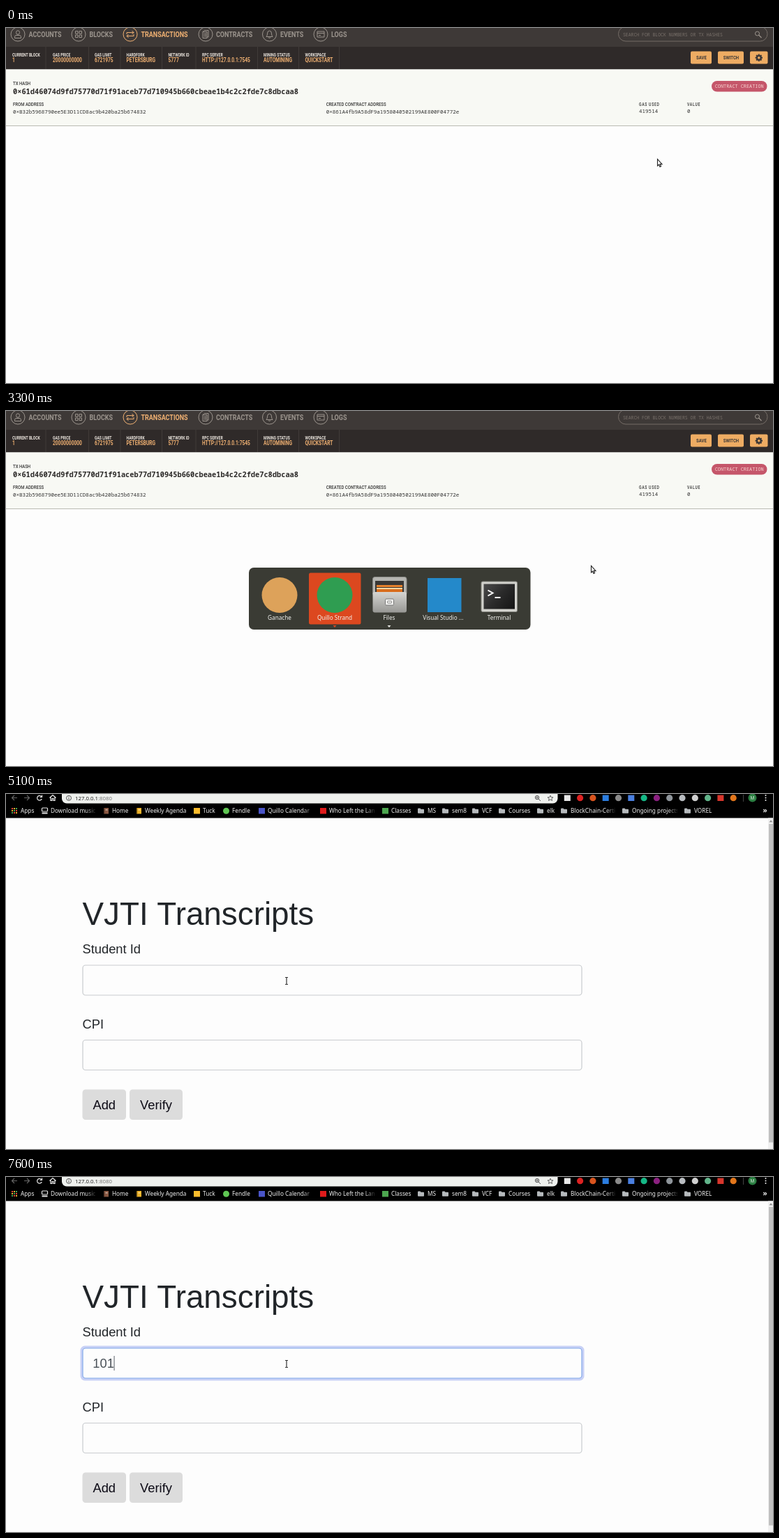
Recreate the animation shown at these times as an HTML page with a canvas. Size 1099 px wide and 510 px high, loop 8000 ms.

```html
<!DOCTYPE html>
<html lang="en">
<head>
<meta charset="utf-8">
<title>Transcripts demo</title>
<style>
html, body { margin: 0; width: 100%; height: 100%; overflow: hidden; background: #fdfdfd; }
canvas { display: block; width: 1099px; height: 510px; }
</style>
</head>
<body>
<canvas id="stage"></canvas>
<script>
const W = 1099, H = 510, LOOP = 8000;
const canvas = document.getElementById('stage');
const ctx = canvas.getContext('2d');
const dpr = window.devicePixelRatio || 1;
canvas.width = W * dpr;
canvas.height = H * dpr;

const MONO = '"Noto Sans Mono", monospace';
const UI = '"Noto Sans", sans-serif';
const ARIAL = '"Liberation Sans", Arial, sans-serif';
const ORANGE = '#efb072', GREY = '#9b948d', BAR = '#3e3937';

function rect(x, y, w, h, fill) {
  ctx.fillStyle = fill;
  ctx.fillRect(x, y, w, h);
}

function box(x, y, w, h, r, fill, stroke, lw = 1) {
  ctx.beginPath();
  ctx.roundRect(x, y, w, h, r);
  paint(fill, stroke, lw);
}

function disc(x, y, r, fill, stroke, lw = 1) {
  ctx.beginPath();
  ctx.arc(x, y, r, 0, 2 * Math.PI);
  paint(fill, stroke, lw);
}

function paint(fill, stroke, lw) {
  if (fill) { ctx.fillStyle = fill; ctx.fill(); }
  if (stroke) { ctx.strokeStyle = stroke; ctx.lineWidth = lw; ctx.stroke(); }
}

// SVG path data, placed at (x, y)
function shape(d, x, y, fill, stroke, lw = 1) {
  const p = new Path2D(d);
  ctx.save();
  ctx.translate(x, y);
  if (fill) { ctx.fillStyle = fill; ctx.fill(p); }
  if (stroke) { ctx.strokeStyle = stroke; ctx.lineWidth = lw; ctx.stroke(p); }
  ctx.restore();
}

function text(s, x, y, font, color, align = 'left') {
  ctx.font = font;
  ctx.fillStyle = color;
  ctx.textAlign = align;
  ctx.fillText(s, x, y);
}

// Roboto in a condensed cut
function narrow(s, x, y, size, color, weight = 700, spacing = 0) {
  ctx.save();
  ctx.translate(x, y);
  ctx.scale(0.78, 1);
  ctx.letterSpacing = spacing + 'px';
  text(s, 0, 0, `${weight} ${size}px Roboto, sans-serif`, color);
  ctx.restore();
}

// ---- Block explorer ----

const NAV = [
  ['ACCOUNTS', 17, 32.5, 'M-4.5 5.5V3.5Q-4.5 1.5-2 1.5H2Q4.5 1.5 4.5 3.5V5.5ZM-2.5-2.5a2.5 2.8 0 1 0 5 0a2.5 2.8 0 1 0-5 0'],
  ['BLOCKS', 104, 119.5, 'M-4.5-4.5h3.5v3.5h-3.5zM1-4.5h3.5v3.5h-3.5zM-4.5 1h3.5v3.5h-3.5zM1 1h3.5v3.5h-3.5z'],
  ['TRANSACTIONS', 178, 193.5, 'M-5 0V-2.5H5M2.5-5L5-2.5L2.5 0M5 0V2.5H-5M-2.5 0L-5 2.5L-2.5 5'],
  ['CONTRACTS', 286, 301, 'M-2-5.5H4V4H2M-4-3.5L-2-5.5M-4-3.5V5.5H2V-3.5H-4M-2.5-1H1M-2.5 1H1M-2.5 3H1'],
  ['EVENTS', 377.5, 393, 'M-4.5 3.5Q-3 2-3-1Q-3-5 0-5Q3-5 3-1Q3 2 4.5 3.5ZM-1.5 4.5Q0 6.5 1.5 4.5'],
  ['LOGS', 451, 466, 'M-5-4H5V4H-5ZM-5-1.5H5M-3 1.5H0']
];

const INFO = [
  [9, 'CURRENT BLOCK', '1', 56.5],
  [67, 'GAS PRICE', '20000000000', 118],
  [127, 'GAS LIMIT', '6721975', 163.5],
  [172.5, 'HARDFORK', 'PETERSBURG', 223],
  [232.5, 'NETWORK ID', '5777', 271.5],
  [281, 'RPC SERVER', 'HTTP://127.0.0.1:7545', 360],
  [369, 'MINING STATUS', 'AUTOMINING', 419],
  [428.5, 'WORKSPACE', 'QUICKSTART', 477]
];

function gear(x, y) {
  ctx.strokeStyle = BAR;
  ctx.lineWidth = 2.2;
  for (let i = 0; i < 4; i++) {
    const c = Math.cos(i * Math.PI / 4) * 5.2, s = Math.sin(i * Math.PI / 4) * 5.2;
    ctx.beginPath();
    ctx.moveTo(x - c, y - s);
    ctx.lineTo(x + c, y + s);
    ctx.stroke();
  }
  disc(x, y, 4, BAR);
  disc(x, y, 1.7, '#eeac63');
}

function explorer() {
  rect(0, 0, W, H, '#fdfdfd');
  rect(0, 0, W, 27, BAR);
  rect(0, 27, W, 32.5, '#2f2a29');
  rect(0, 59.5, W, 81, '#f8f9f4');
  rect(0, 140, W, 1, '#b9bab3');

  for (const [label, ix, tx, icon] of NAV) {
    const c = label === 'TRANSACTIONS' ? ORANGE : GREY;
    disc(ix, 9, 10, null, c);
    shape(icon, ix, 9, null, c);
    narrow(label, tx, 13.3, 11.5, c);
  }
  box(877.5, -2, 213.5, 21, 10.5, null, '#756d67');
  text('SEARCH FOR BLOCK NUMBERS OR TX HASHES', 884, 11.8, '6.45px ' + MONO, '#78706a');
  disc(1076.5, 8, 3, null, GREY);
  shape('M0 0L4 4', 1078.5, 10, null, GREY, 1.2);

  for (const [x, label, value, edge] of INFO) {
    narrow(label, x, 41, 6.5, '#ece6df');
    narrow(value, x, 48.5, 8.5, ORANGE);
    rect(edge, 27, 1, 32, '#413b39');
  }
  for (const [x, w, label, tx] of [[981, 30, 'SAVE', 989], [1020, 37, 'SWITCH', 1027.7], [1066, 25.5, '', 0]]) {
    box(x, 33.5, w, 18, 2, '#eeac63');
    narrow(label, tx, 45.3, 7.7, BAR);
  }
  gear(1078.8, 42.7);

  narrow('TX HASH', 10, 81.8, 7.7, '#333', 500);
  text('0×61d46074d9fd75770d71f91aceb77d710945b660cbeae1b4c2c2fde7c8dbcaa8', 10, 94.8, '600 10.33px ' + MONO, '#2c2a29');
  narrow('FROM ADDRESS', 10, 112.2, 7.7, '#333', 500);
  narrow('CREATED CONTRACT ADDRESS', 458.7, 112.2, 7.7, '#333', 500);
  narrow('GAS USED', 907, 111.5, 6.6, '#333', 500, 0.9);
  narrow('VALUE', 976, 111.5, 6.6, '#333', 500, 0.9);
  const small = '7.57px ' + MONO;
  text('0×B32b5968790ee5E3D11CD8ac9b420ba25b674832', 10, 123, small, '#333');
  text('0×861A4fb9A58dF9a1958040502199AE800F04772e', 458.7, 123, small, '#333');
  text('419514', 907, 122, small, '#333');
  text('0', 976, 122, small, '#333');
  box(1011, 76, 79.5, 15.5, 7.75, '#c5566a');
  text('CONTRACT CREATION', 1015.7, 86.3, '6.87px ' + MONO, '#f8d3d0');
}

// ---- Window switcher ----

function cabinet() {
  box(525.5, 238.5, 48.5, 26, 3, '#b5b5b1', '#8a8a86');
  rect(529, 244, 41, 16, '#393735');
  rect(531, 250, 37, 3, '#e9822b');
  rect(531, 254, 37, 2, '#f7d7a0');
  rect(531, 256, 37, 4, '#d96d1d');
  const g = ctx.createLinearGradient(0, 260, 0, 290);
  g.addColorStop(0, '#d5d5d2');
  g.addColorStop(1, '#969693');
  box(525.5, 260, 48.5, 29.5, 3, g);
  box(543.5, 270, 12, 9, 1.5, '#f2f2f0', '#777');
  box(546.5, 273, 6, 3, 1, null, '#888');
}

function terminal() {
  box(681, 245, 51.5, 43.5, 2, '#d2d2cd', '#85857f');
  const g = ctx.createLinearGradient(685, 249, 728, 284);
  g.addColorStop(0, '#4a4a4a');
  g.addColorStop(0.5, '#2a2a2a');
  g.addColorStop(1, '#151515');
  rect(684.5, 248.5, 44.5, 36, g);
  shape('M0 0L7 4L0 8M10 10.5H18', 690.5, 257.5, null, '#fff', 2);
}

const APPS = [['Ganache', 392], ['Quillo Strand', 471], ['Files', 549], ['Visual Studio ...', 626.3], ['Terminal', 706.5]];

function switcher(panel, tile, icons, labels) {
  ctx.save();
  ctx.globalAlpha = panel;
  box(348, 225, 403.5, 89, 7, '#3a3b34');
  ctx.globalAlpha = tile;
  box(434, 232.5, 74.5, 74, 2.5, '#dc481f');
  shape('M-2.5-1H2.5L0 2Z', 471, 309, '#dc481f');
  shape('M-2.5-1H2.5L0 2Z', 549, 309, '#e8e8e4');
  ctx.globalAlpha = icons;
  disc(392, 264.5, 25.5, '#dda25a');
  disc(471, 264.5, 25.5, '#2f9d51');
  cabinet();
  rect(604, 240, 48.5, 49, '#2489ca');
  terminal();
  ctx.globalAlpha = labels;
  for (const [name, x] of APPS) text(name, x, 300, '8.2px ' + UI, '#f2f2ee', 'center');
  ctx.restore();
}

function previews() {
  ctx.save();
  ctx.globalAlpha = 0.24;
  box(303, 323, 336, 185.5, 6, '#3a3b34');
  ctx.globalAlpha = 0.5;
  for (const x of [316, 479]) {
    rect(x, 372, 147, 75.5, '#e4e4e2');
    rect(x, 372, 147, 8, '#5c5c5c');
    rect(x + 11, 374.5, 95, 2.5, '#d8d8d6');
  }
  text('VJTI Transcripts', 331, 400, '6.2px ' + ARIAL, '#667762');
  rect(331, 404.5, 12, 1.5, '#999');
  rect(331, 418.5, 4, 1.5, '#999');
  rect(331, 432, 8, 5, '#aaa');
  rect(340.5, 432, 9, 5, '#aaa');

  rect(479, 380, 5, 67, '#c8d0d4');
  rect(484, 380, 30, 67, '#d2d7d9');
  for (let i = 0; i < 9; i++) rect(486, 384 + i * 6, 14 + i * 5 % 11, 1.5, '#999');
  rect(486, 407, 10, 4, '#f29a38');
  rect(486, 413.5, 10, 4, '#48a3cc');
  rect(485, 427, 28, 4, '#6f9fb5');
  for (let i = 0; i < 9; i++) rect(520, 383 + i * 3.2, 22 + i * 17 % 38, 1.2, '#8b9494');
  rect(514, 414, 112, 2, '#bbb');
  rect(615, 440, 7, 4, '#777');
  ctx.globalAlpha = 0.12;
  text('VJTI Transcripts - Quillo Strand', 389.5, 494, '8.2px ' + UI, '#fff', 'center');
  text('Remix - Ethereum IDE - Quillo Strand', 552.5, 494, '8.2px ' + UI, '#fff', 'center');
  ctx.restore();
}

// ---- Browser ----

// label, x, icon kind, icon colour, clip edge
const MARKS = [
  ['Apps', 21, 'apps'],
  ['Download music', 64, 'page', '#e6e6e6', 128],
  ['Home', 152, 'book', '#8b5a44'],
  ['Weekly Agenda', 199, 'book', '#f0b429'],
  ['Tuck', 282, 'square', '#fbbc2c'],
  ['Fendle', 324, 'disc', '#5fc653'],
  ['Quillo Calendar', 375, 'square', '#4a55c8', 439],
  ['Who Left the Lamps', 463, 'square', '#e01b1b', 528],
  ['Classes', 552, 'square', '#4ca64f'],
  ['MS', 604], ['sem8', 639], ['VCF', 682], ['Courses', 720], ['elk', 775],
  ['BlockChain-Certificate', 809, 'folder', '', 873],
  ['Ongoing projects', 897, 'folder', '', 962],
  ['VOREL', 986]
];

function markIcon(kind, x, color) {
  if (kind === 'apps') {
    const hues = ['#e8453c', '#f4b52c', '#46a853'];
    for (let i = 0; i < 9; i++) rect(8 + i % 3 * 3, 20 + (i / 3 | 0) * 3, 2, 2, hues[(i + (i / 3 | 0)) % 3]);
  } else if (kind === 'page') {
    box(x + 0.5, 20, 8, 5, 1, null, color, 1.2);
    rect(x + 0.5, 26.5, 8, 2, color);
  } else if (kind === 'book') {
    rect(x + 1, 20, 7, 8.5, color);
    rect(x + 1, 20, 1.5, 8.5, '#0005');
    rect(x + 3.5, 22, 3, 1.5, '#fff8');
  } else if (kind === 'square') {
    rect(x, 20, 9, 8.5, color);
  } else if (kind === 'disc') {
    disc(x + 4.5, 24.2, 4.5, color);
  } else {
    shape('M0 1Q0 0 1 0H3.5L4.5 1.2H8Q9 1.2 9 2V6.5Q9 7.3 8 7.3H1Q0 7.3 0 6.5Z', x, 20.5, '#b6babd');
  }
}

const EXTENSIONS = '#e8e8e8 #dd2222 #d9541e #2b7de0 #8b8b8b #4a7fe0 #15b886 #8b2080 #8f959b #b9bdc1 #d0d0d0 #62b58b #d8362c #e2761b'.split(' ');
const SQUARES = [0, 3, 5, 12];

function chrome() {
  rect(0, 0, W, 34.5, '#000');
  const arrow = 'M4 0H-3.5M0-3.5L-3.5 0L0 3.5';
  shape(arrow, 12, 5.5, null, '#666', 1.2);
  shape('M-4 0H3.5M0-3.5L3.5 0L0 3.5', 30, 5.5, null, '#666', 1.2);
  shape('M3-1.5A3.4 3.4 0 1 0 3.2 1.5M3.5-4V-1H0.5', 48, 5.5, null, '#eee', 1.2);
  shape('M-4.5 0L0-4L4.5 0M-3-1V4H-1V1H1V4H3V-1', 67, 5.5, null, '#eee', 1.2);

  box(80, -6, 710.5, 19.5, 7, '#eff1ee');
  disc(90, 5.8, 3.5, null, '#555');
  rect(89.5, 5.3, 1, 2.7, '#555');
  rect(89.5, 3.6, 1, 1, '#555');
  const url = '7.8px ' + UI;
  text('127.0.0.1', 99, 8.6, url, '#222');
  text(':8080', 99 + ctx.measureText('127.0.0.1').width, 8.6, url, '#777');
  disc(761, 5, 2.7, null, '#555');
  shape('M0 0L3 3M-3.5-2H-.5M-2-3.5V-.5', 763, 7, null, '#555');
  shape('M0-4L1.1-1.3L4-1.2L1.8 .6L2.5 3.5L0 1.9L-2.5 3.5L-1.8 .6L-4-1.2L-1.1-1.3Z', 780, 6, null, '#555', 0.9);

  EXTENSIONS.forEach((color, i) => {
    const x = 804.3 + i * 18.3;
    if (SQUARES.includes(i)) rect(x - 4.5, 1.5, 9, 8.5, color);
    else disc(x, 5.7, 4.6, color);
  });
  rect(1056, 1, 1, 10, '#444');
  disc(1069.5, 5.5, 6, '#2b7f42');
  text('M', 1069.5, 8, '6.5px ' + UI, '#dfeee2', 'center');
  for (const y of [2, 5.5, 9]) disc(1088.5, y, 1, '#eee');

  for (const [label, x, kind, color, edge] of MARKS) {
    markIcon(kind, x - 14 + (kind && kind !== 'folder' ? 1 : 0), color);
    ctx.save();
    let ink = '#f0f0f0';
    if (edge) {
      ctx.beginPath();
      ctx.rect(x, 15, edge - x, 18);
      ctx.clip();
      ink = ctx.createLinearGradient(edge - 14, 0, edge, 0);
      ink.addColorStop(0, '#f0f0f0');
      ink.addColorStop(1, '#222');
    }
    text(label, x, 27.2, '8.25px ' + UI, ink);
    ctx.restore();
  }
  text('»', 1084.5, 27, '700 10px ' + UI, '#eee');
}

function field(y, focus) {
  if (focus) box(106.5, y - 3.5, 722, 50, 6.5, '#c8d1f6');
  box(110, y, 715, 43, 4, '#fdfdfd', focus ? '#82a9ea' : '#c9cccf', 1.2);
}

function button(x, w, label) {
  box(x, 424.5, w, 43.5, 4.5, '#dcdcdc');
  text(label, x + w / 2, 453, '18.32px ' + ARIAL, '#0d0b16', 'center');
}

function page(t) {
  rect(0, 0, W, H, '#fdfdfd');
  chrome();
  rect(1092, 34.5, 7, H, '#f0f0f0');
  rect(1093, 43, 6, 457.5, '#c0c0c0');
  shape('M-2.5 1.5H2.5L0-1.5Z', 1096, 39, '#888');

  const body = '18.32px ' + ARIAL;
  text('VJTI Transcripts', 109.5, 188, '45.8px ' + ARIAL, '#212529');
  text('Student Id', 109.5, 229, body, '#212529');
  text('CPI', 109.5, 336.8, body, '#212529');
  field(246, t >= 5500);
  field(353.5, false);
  button(109.5, 62.5, 'Add');
  button(177, 76, 'Verify');

  const typed = '101'.slice(0, [6800, 6900, 7600].filter(k => t >= k).length);
  text(typed, 124.3, 274, body, '#495057');
  const caretOn = (t >= 5500 && t < 6000) || (t >= 6600 && t < 7500) || t >= 7600;
  if (caretOn) rect(124 + ctx.measureText(typed).width, 257, 1, 21, '#5a6067');
}

// ---- Pointer ----

// start, steps of 100 ms, bend x, bend y, end x, end y
const LEGS = [
  [700, 9, 1195, 12, 1028, 151],
  [1600, 1, 1032, 151, 1035.5, 152],
  [1800, 7, 1000, 90, 838, 222],
  [4200, 1, 780, 218, 727, 215],
  [4400, 2, 655, 208, 588, 206],
  [4700, 5, 460, 215, 402, 268.5]
];

function pointerAt(t) {
  let x = 933, y = 188;
  for (const [start, steps, bx, by, ex, ey] of LEGS) {
    if (t < start) break;
    const u = Math.min(1, (Math.floor((t - start) / 100) + 1) / steps);
    const mix = (a, b, c) => (1 - u) ** 2 * a + 2 * u * (1 - u) * b + u * u * c;
    x = mix(x, bx, ex);
    y = mix(y, by, ey);
  }
  return [x, y];
}

function pointer(t) {
  const [x, y] = pointerAt(t);
  if (t >= 4700 && y > 246) {
    const beam = 'M-2-5H2M0-5V5M-2 5H2';
    shape(beam, x, y, null, '#fff', 2.6);
    shape(beam, x, y, null, '#333', 1.2);
  } else {
    shape('M.5.5V10L2.6 8.2L4 11.5L5.6 10.8L4.2 7.6H7Z', x, y, '#fff', '#222', 1.1);
  }
}

function draw(t) {
  ctx.setTransform(dpr, 0, 0, dpr, 0, 0);
  if (t < 3700) explorer();
  else page(t);
  if (t >= 3300 && t < 3700) switcher(1, 1, 1, 1);
  if (t >= 3700 && t < 3800) {
    switcher(0.24, 0.32, 0.45, 0.15);
    previews();
  }
  pointer(t);
}

const begin = performance.now();
function tick() {
  draw((performance.now() - begin) % LOOP);
  requestAnimationFrame(tick);
}
tick();
</script>
</body>
</html>
```
